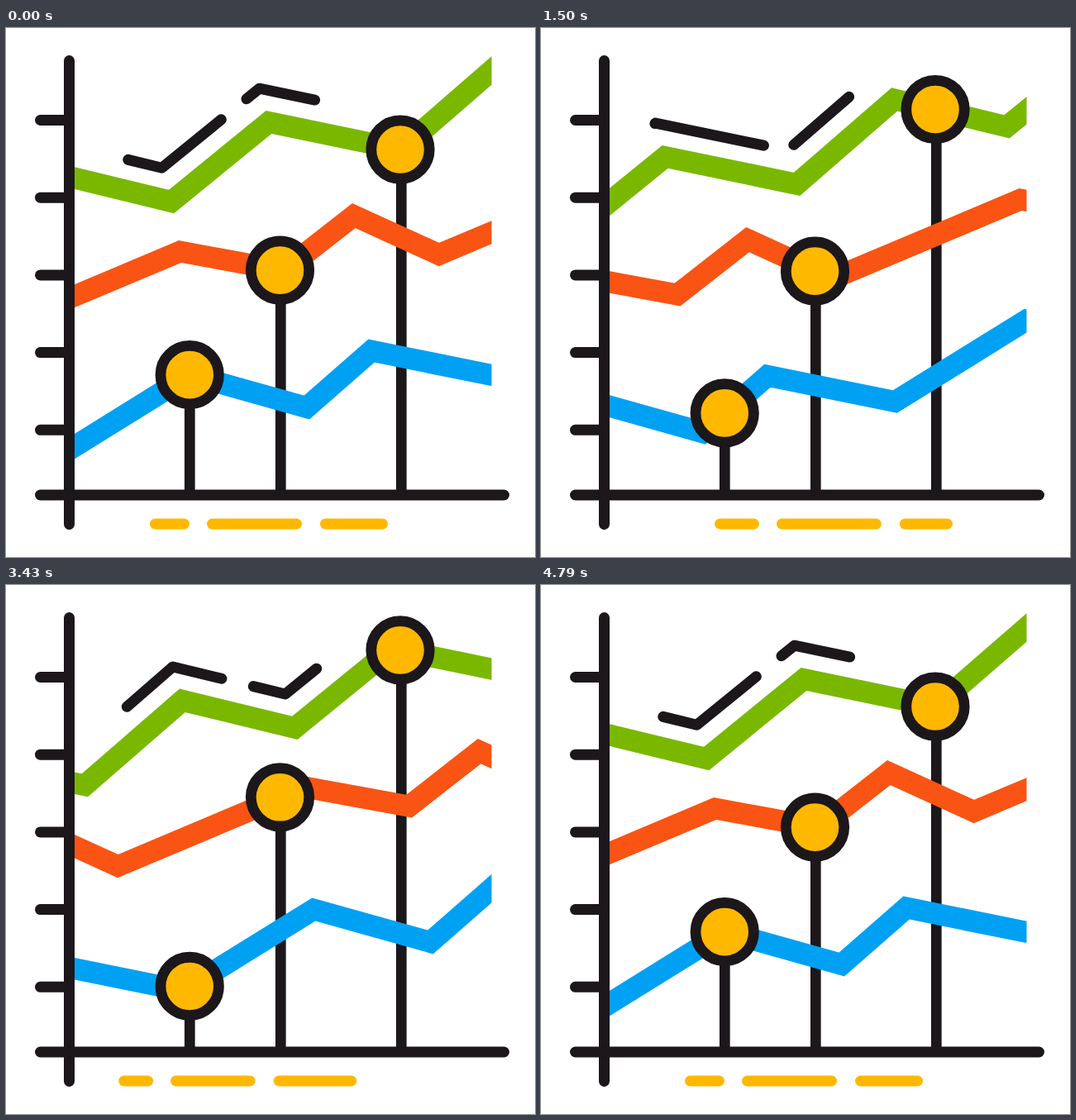
These frames come from a looping animation (640x640 px, 4.87 s). An HTML page:

```html
<!DOCTYPE html>
<html lang="en">
<head>
<meta charset="utf-8">
<title>Line chart</title>
<style>
  html, body { margin: 0; width: 100%; height: 100%; overflow: hidden; background: #fff; }
  svg { display: block; width: 100%; height: 100%; }
</style>
</head>
<body>
<svg id="stage" viewBox="0 0 640 640" fill="none">
  <clipPath id="plot"><rect x="78" y="0" width="509.5" height="640"/></clipPath>
</svg>
<script>
const INK = '#1b171b', YELLOW = '#ffb800';
const LOOP = 4870, STEPS = 67, FPS = 14;

// Each line repeats four segments; start is the first peak at time zero.
const lines = [
  { color: '#7ab800', start: [318, 114], knob: 477, probe: 477.5, stick: 478.3,
    segs: [[159.5, 33], [118, -102.5], [136, 33], [118, -96]] },
  { color: '#f95414', start: [210.5, 270.5], knob: 331.5, probe: 333.5, stick: 332.3,
    segs: [[125.3, 23], [85, -66.5], [103, 47], [227, -95.5]] },
  { color: '#00a1f3', start: [222.8, 419.4], knob: 222.2, probe: 222.4, stick: 222.3,
    segs: [[141, 39.6], [78.3, -68.5], [154.3, 31.3], [158.5, -98.3]] }
];

// Yellow bars: rest position of both ends and how far each end swings.
const bars = [
  { ends: [174, 222], gain: [1, 1.164] },
  { ends: [243, 358], gain: [1.164, 1.493] },
  { ends: [380, 462], gain: [1.493, 1] }
];

const svg = document.getElementById('stage');

function add(name, attrs, parent = svg) {
  const el = document.createElementNS('http://www.w3.org/2000/svg', name);
  set(el, attrs);
  return parent.appendChild(el);
}

function set(el, attrs) {
  for (const key in attrs) el.setAttribute(key, attrs[key]);
}

function bar(d, color = INK, width = 13) {
  return add('path', { d, stroke: color, 'stroke-width': width, 'stroke-linecap': 'round', 'stroke-linejoin': 'round' });
}

for (const l of lines) l.pole = add('path', { stroke: INK, 'stroke-width': 12.7 });

const plot = add('g', { 'clip-path': 'url(#plot)' });
for (const l of lines) {
  l.span = l.segs.reduce((s, v) => [s[0] + v[0], s[1] + v[1]], [0, 0]);
  l.path = add('path', { stroke: l.color, 'stroke-width': 26 }, plot);
}

bar('M76.5 39.5V600.5');
bar('M41.5 565H602.5');
for (let i = 0; i < 5; i++) bar(`M41.5 ${111.5 + i * 93.7}H76`);

for (const l of lines) {
  l.dot = add('circle', { cx: l.knob, r: 35.2, fill: YELLOW, stroke: INK, 'stroke-width': 12.8 });
}

const accent = bar('');
set(accent, { 'stroke-dasharray': '134.5 39.5 88.5 9999' });
const accentLap = lines[0].segs.reduce((s, v) => s + Math.hypot(...v), 0);

for (const b of bars) b.el = bar('', YELLOW);

// Points from one repeat before to two repeats after, slid back along the trend.
function points(l, u) {
  let x = l.start[0] - l.span[0] * (1 + u);
  let y = l.start[1] - l.span[1] * (1 + u);
  const pts = [[x, y]];
  for (let rep = 0; rep < 4; rep++) {
    for (const [dx, dy] of l.segs) pts.push([x += dx, y += dy]);
  }
  return pts;
}

function heightAt(pts, x) {
  const i = pts.findIndex(p => p[0] > x);
  const [a, b] = [pts[i - 1], pts[i]];
  return a[1] + (b[1] - a[1]) * (x - a[0]) / (b[0] - a[0]);
}

function polyline(pts, dx = 0, dy = 0) {
  return 'M' + pts.map(p => (p[0] + dx).toFixed(2) + ' ' + (p[1] + dy).toFixed(2)).join('L');
}

function draw(ms) {
  const t = Math.floor((ms % LOOP) / 10) * 10;
  const step = Math.min(STEPS, Math.floor((t + 5) * FPS / 1000));
  const u = step % STEPS ? (step + 0.17) / STEPS : 0;

  for (const l of lines) {
    const pts = points(l, u);
    const y = heightAt(pts, l.probe);
    set(l.path, { d: polyline(pts) });
    set(l.dot, { cy: y });
    set(l.pole, { d: `M${l.stick} ${y}V565` });
    if (l === lines[0]) {
      const from = accentLap * (1 + u) - 194;
      set(accent, { d: polyline(pts, -11.5, -40.8), 'stroke-dashoffset': -from });
    }
  }

  const a = u * 2 * Math.PI;
  const swing = 40 * Math.sin(a) + 1.8 * Math.sin(3 * a);
  for (const b of bars) {
    const [x1, x2] = b.ends.map((x, i) => x + swing * b.gain[i]);
    set(b.el, { d: `M${x1 + 6.5} 600H${x2 - 6.5}` });
  }
}

const begin = performance.now();
function tick() {
  draw(performance.now() - begin);
  requestAnimationFrame(tick);
}
draw(0);
requestAnimationFrame(tick);
</script>
</body>
</html>
```
